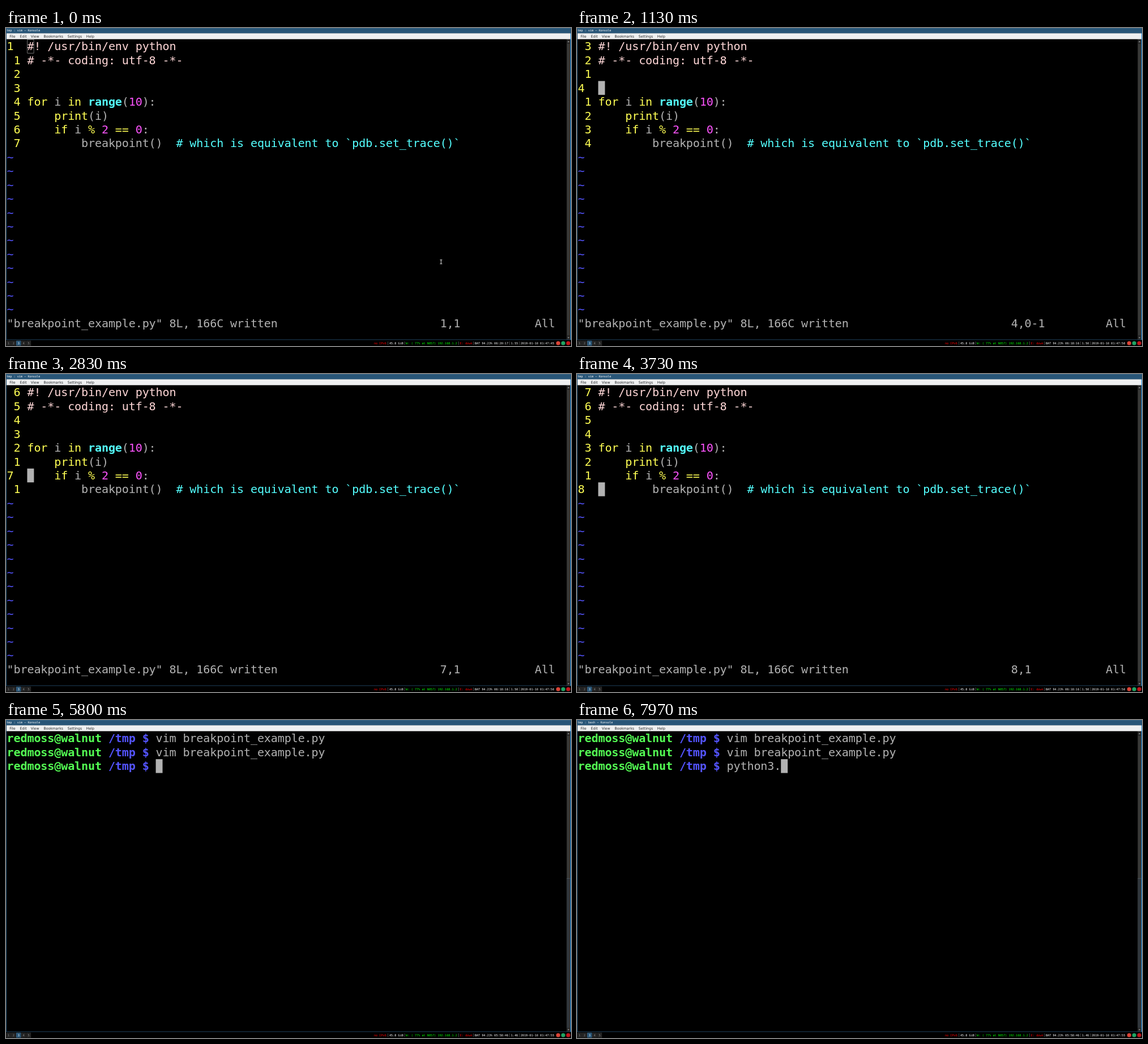
These frames come from a looping animation (998 by 561 pixels, 8 s). An HTML page with a canvas:

```html
<!DOCTYPE html>
<html lang="en">
<head>
<meta charset="utf-8">
<title>Terminal session</title>
<style>
html, body { margin: 0; width: 100%; height: 100%; overflow: hidden; background: #000; }
canvas { display: block; width: 998px; height: 561px; }
</style>
</head>
<body>
<canvas id="stage" width="998" height="561"></canvas>
<script>
const ctx = document.getElementById('stage').getContext('2d');
const LOOP = 8000;
const MONO = '"DejaVu Sans Mono", monospace';
const SANS = '"DejaVu Sans", sans-serif';

// Terminal grid
const LEFT = 1.56, TOP = 20.26, CELL = 11.955, ROW = 24.42, BASE = 19.22;
const GRAY = '#b2b2b2', YELLOW = '#ffff54', CYAN = '#54ffff', PINK = '#ffd7d7',
      MAGENTA = '#ff54ff', BLUE = '#5454ff', GREEN = '#54ff54';
// Window frame
const FRAME = '#285577', EDGE = '#4c7899', SPLIT = '#2e9ef4';

// Each code line is a list of [text, colour, bold] runs
const CODE = [
  [['#! /usr/bin/env python', PINK]],
  [['# -*- coding: utf-8 -*-', PINK]],
  [],
  [],
  [['for', YELLOW], [' i ', GRAY], ['in ', YELLOW], ['range', CYAN, true], ['(', GRAY], ['10', MAGENTA], ['):', GRAY]],
  [['    print', YELLOW], ['(i)', GRAY]],
  [['    if', YELLOW], [' i ', GRAY], ['% ', YELLOW], ['2', MAGENTA], [' == ', YELLOW], ['0', MAGENTA], [':', GRAY]],
  [['        breakpoint()  ', GRAY], ['# which is equivalent to `pdb.set_trace()`', CYAN]]
];
const PROMPT = [['redmoss@walnut ', GREEN, true], ['/tmp $ ', BLUE, true]];
const COMMAND = 'vim breakpoint_example.py';
const TYPED = 'python3.';

// Event times in ms
const MOVES = [400, 730, 1030, 1400, 1720, 2830, 3030];
const KEYS = [6500, 6700, 7100, 7370, 7470, 7570, 7700, 7830];
const TICKS = [500, 5500];
const FOCUS = 30, QUIT = 5650, RETITLE = 6000;

const passed = (times, t) => times.filter(at => t >= at).length;

function rect(x, y, w, h, color) {
  ctx.fillStyle = color;
  ctx.fillRect(x, y, w, h);
}

function label(str, x, y, size, color, family = MONO) {
  ctx.font = `${size}px ${family}`;
  ctx.fillStyle = color;
  ctx.fillText(str, x, y);
}

function put(str, col, row, color, bold) {
  ctx.font = `${bold ? 'bold ' : ''}20.1px ${MONO}`;
  ctx.fillStyle = color;
  [...str].forEach((ch, i) => {
    if (ch !== ' ') ctx.fillText(ch, LEFT + (col + i) * CELL, TOP + row * ROW + BASE);
  });
}

function putRuns(runs, col, row) {
  for (const [str, color, bold] of runs) {
    put(str, col, row, color, bold);
    col += str.length;
  }
  return col;
}

function cursor(col, row, ch = ' ', focused = true) {
  const x = LEFT + col * CELL, y = TOP + row * ROW;
  if (focused) {
    rect(x, y, CELL, ROW, GRAY);
    put(ch, col, row, '#000');
  } else {
    ctx.strokeStyle = GRAY;
    ctx.lineWidth = 0.6;
    ctx.strokeRect(x + 0.3, y + 0.3, CELL - 0.6, ROW - 0.6);
  }
}

function pointer(x, y) {
  ctx.beginPath();
  ctx.moveTo(x - 2, y - 3.5);
  ctx.lineTo(x + 2, y - 3.5);
  ctx.moveTo(x, y - 3.5);
  ctx.lineTo(x, y + 3.5);
  ctx.moveTo(x - 2, y + 3.5);
  ctx.lineTo(x + 2, y + 3.5);
  ctx.strokeStyle = '#ddd';
  ctx.lineWidth = 1;
  ctx.stroke();
}

function editor(t) {
  const line = passed(MOVES, t);
  CODE.forEach((runs, i) => {
    if (i === line) put(String(i + 1), 0, i, YELLOW);
    else put(String(Math.abs(i - line)), 1, i, YELLOW);
    putRuns(runs, 3, i);
  });
  for (let row = CODE.length; row < 20; row++) put('~', 0, row, BLUE);
  put('"breakpoint_example.py" 8L, 166C written', 0, 20, GRAY);
  put(`${line + 1},${CODE[line].length ? '1' : '0-1'}`, 64, 20, GRAY);
  put('All', 78, 20, GRAY);
  const under = CODE[line].length ? CODE[line][0][0][0] : ' ';
  cursor(3, line, under, t >= FOCUS);
  if (line === 0) pointer(768.5, 412.5);
}

function shell(t) {
  const text = TYPED.slice(0, passed(KEYS, t));
  [COMMAND, COMMAND, text].forEach((cmd, row) => {
    put(cmd, putRuns(PROMPT, 0, row), row, GRAY);
  });
  cursor(22 + text.length, 2);
}

function arrow(y, dir) {
  ctx.beginPath();
  ctx.moveTo(991.8, y + dir);
  ctx.lineTo(995.4, y + dir);
  ctx.lineTo(993.6, y - dir);
  ctx.fillStyle = '#999';
  ctx.fill();
}

function scrollbar(scrolled) {
  rect(990.2, 19.7, 6.8, 530.3, '#272727');
  rect(991, 28, 5, 514, '#383836');
  if (scrolled) {
    rect(990.5, 279, 6, 264, '#31363b');
    rect(990.5, 279, 6, 0.6, '#5c646c');
  }
  arrow(24, 1);
  arrow(546.5, -1);
}

function frameAndMenu(t) {
  rect(0, 0, 998, 9.4, FRAME);
  rect(0, 0, 998, 0.52, EDGE);
  rect(0, 8.85, 998, 0.52, EDGE);
  label(`tmp : ${t < RETITLE ? 'vim' : 'bash'} — Konsole`, 1, 6.2, 5.2, '#fff');
  rect(0, 9.4, 1.04, 541.1, FRAME);
  rect(0, 549.5, 998, 1, FRAME);
  rect(996.96, 9.4, 1.04, 541.1, SPLIT);
  rect(1.04, 9.4, 995.92, 10.3, '#eff0f1');
  const menu = { File: 6.2, Edit: 24.6, View: 43.8, Bookmarks: 66.4, Settings: 108.8, Help: 141.8 };
  for (const name in menu) label(name, menu[name], 16.7, 6.2, '#232629', SANS);
}

function statusBar(t) {
  rect(0, 550.5, 998, 10.5, '#000');
  for (let i = 0; i < 5; i++) {
    const x = 0.4 + i * 8.85, on = i === 2;
    rect(x, 551.6, 8.3, 8.8, on ? EDGE : '#333');
    rect(x + 0.5, 552.1, 7.3, 7.8, on ? FRAME : '#222');
    label(String(i + 1), x + 2.6, 557.8, 5.2, on ? '#fff' : '#888');
  }
  const tick = passed(TICKS, t);
  const left = ['06:20:17', '06:18:16', '05:58:46'][tick];
  const load = ['1.55', '1.50', '1.46'][tick];
  const parts = [
    ['no IPv6', 650, '#f00'],
    ['45.8 GiB', 677, '#fff'],
    ['W: ( 77% at N057) 192.168.1.2', 706.3, '#0f0'],
    ['E: down', 801.8, '#f00'],
    [`BAT 94.23% ${left}`, 828, '#fff'],
    [load, 892, '#fff'],
    [`2019-01-10 01:47:${45 + tick * 5}`, 909, '#fff']
  ];
  parts.forEach(([str, x, color], i) => {
    label(str, x, 557.8, 5.2, color);
    if (i) rect(x - 2.5, 553, 0.6, 6, '#777');
  });
  ['#db4437', '#1fa463', '#c4161c'].forEach((color, i) => {
    ctx.beginPath();
    ctx.arc(975.3 + i * 8.9, 556, 3.6, 0, Math.PI * 2);
    ctx.fillStyle = color;
    ctx.fill();
  });
}

function draw(now) {
  const t = now % LOOP;
  rect(0, 0, 998, 561, '#000');
  scrollbar(t >= QUIT);
  frameAndMenu(t);
  if (t < QUIT) editor(t);
  else shell(t);
  statusBar(t);
}

let start;
function loop(now) {
  if (start === undefined) start = now;
  draw(now - start);
  requestAnimationFrame(loop);
}
draw(0);
requestAnimationFrame(loop);
</script>
</body>
</html>
```
